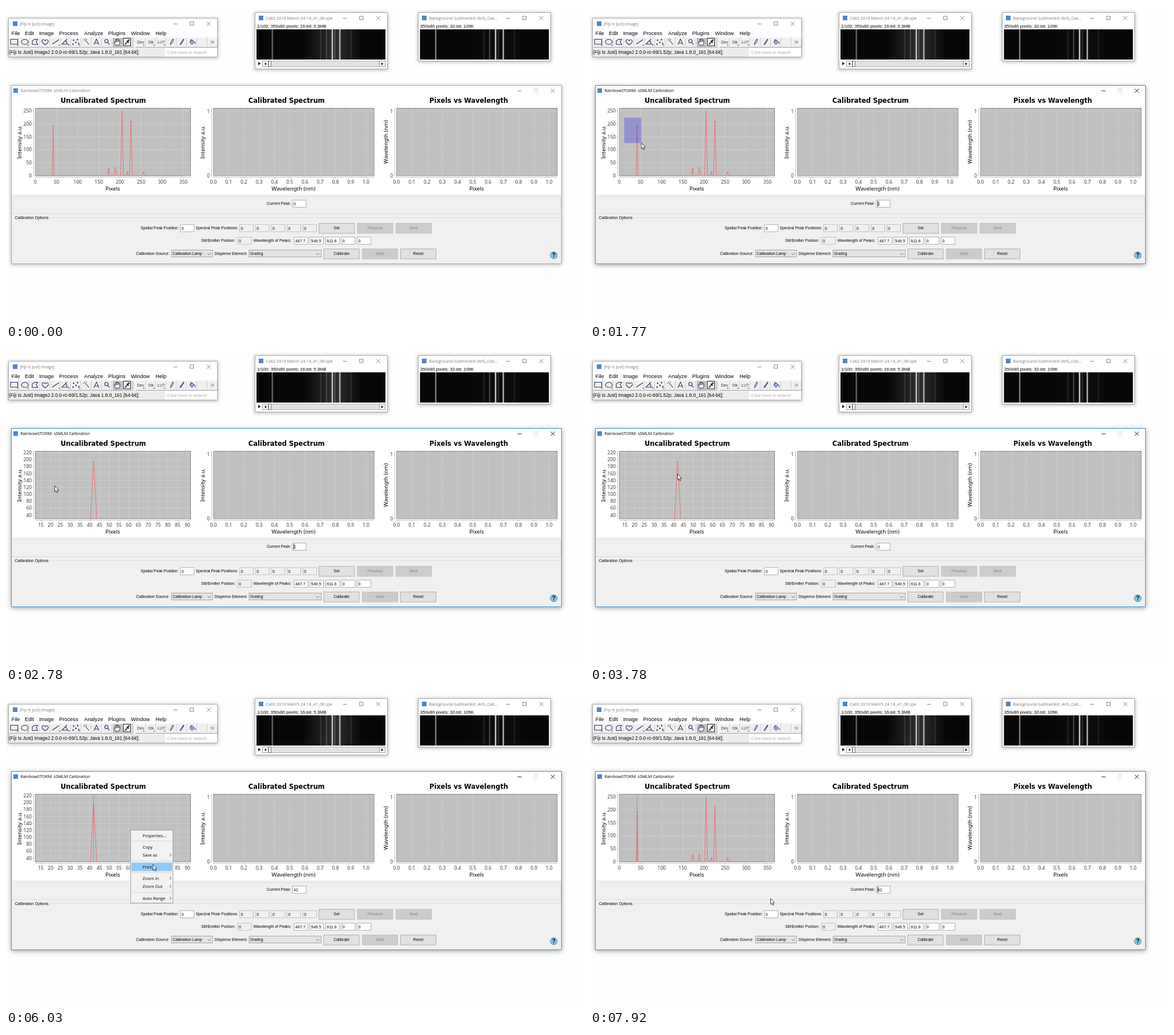
Animation, 1013 px wide and 553 px high, one loop 7990 ms. Source, as an HTML page:

```html
<!DOCTYPE html>
<html lang="en">
<head>
<meta charset="utf-8">
<title>Spectral calibration</title>
<style>
  html, body { margin: 0; width: 100%; height: 100%; overflow: hidden; background: #fefefe; }
  svg { display: block; width: 1013px; height: 553px; }
  text { white-space: pre; }
  .lib { font-family: "Liberation Sans", Arial, sans-serif; }
  .ui { font-family: "Open Sans", "Noto Sans", sans-serif; }
  .plot { font-family: "Noto Sans", "Open Sans", sans-serif; }
  .head { font-family: "DejaVu Sans", sans-serif; font-weight: 700; }
  .win { filter: drop-shadow(0 1.5px 3px rgba(0, 0, 0, .33)); }
  .idle { color: #777; }
  #main { color: #777; --edge: #aaa; }
  #main.active { color: #000; --edge: #3c94da; }
  #main.active .win { filter: drop-shadow(0 2px 4.5px rgba(0, 0, 0, .36)); }
</style>
</head>
<body>
<svg id="stage" viewBox="0 0 1013 553"></svg>
<script>
const LOOP = 7990;

// ---------- drawing helpers (y of text is its visual middle) ----------
const text = (x, y, s, { size = 6.85, font = 'lib', fill = '#000', anchor = 'start', extra = '' } = {}) =>
  `<text class="${font}" x="${x}" y="${(y + size * .36).toFixed(2)}" font-size="${size}" fill="${fill}" text-anchor="${anchor}" ${extra}>${s}</text>`;
const rect = (x, y, w, h, fill, stroke = 'none', extra = '') =>
  `<rect x="${x}" y="${y}" width="${w}" height="${h}" fill="${fill}" stroke="${stroke}" ${extra}/>`;
const path = (d, stroke = '#000', fill = 'none', extra = '') =>
  `<path d="${d}" stroke="${stroke}" fill="${fill}" ${extra}/>`;
const group = (id, body, extra = '') => `<g id="${id}" ${extra}>${body}</g>`;

function titleBar(x, y, label, buttonX, maxColor = 'currentColor') {
  const b = buttonX;
  return rect(x, y - 4, 8, 8, '#4f86c0') +
    text(x + 12.5, y, label, { size: 7.35, font: 'ui', fill: 'currentColor' }) +
    path(`M${b - 3.5} ${y + .5}h7M${b + 54.8} ${y - 3.3}l7 7m0-7l-7 7`, 'currentColor', 'none', 'stroke-width=".9"') +
    rect(b + 25.7, y - 3, 6, 6, 'none', maxColor, 'stroke-width=".9"');
}
const frame = (x, y, w, h, edge = '#aaa', fill = '#fff') => rect(x, y, w, h, fill, edge, 'class="win"');

// ---------- toolbar window ----------
function toolbarWindow() {
  const ink = '#24325c', cy = 63;
  let s = frame(4.5, 21.5, 366, 68) + titleBar(12, 31, '(Fiji Is Just) ImageJ', 297);
  const menus = [['File', 9.5], ['Edit', 33], ['Image', 58], ['Process', 93], ['Analyze', 137],
    ['Plugins', 179], ['Window', 219], ['Help', 262]];
  for (const [name, x] of menus) s += text(x, 47.5, name, { size: 9.3 });
  s += rect(5, 54.5, 365, 18.5, '#f0f0f0') + rect(5, 73, 365, 16, '#ececec') + rect(279, 74, 91, 15, '#fff');
  s += rect(186, 55, 18, 18, '#c4c4c4');
  for (let i = 0; i < 20; i++) {
    const x = i < 12 ? 5.5 + 18.1 * i : 227 + 18.05 * (i - 12);
    s += path(`M${x} 72.5V55.5h17.5`, '#fff') + path(`M${x + 17.6} 55.5v17H${x}`, '#a4a4a4');
  }
  const icons = [
    'M8 58.5h12.5v8.5H8z',
    'M27 63a6 4.5 0 1 0 12 0a6 4.5 0 1 0-12 0',
    'M46 67.5V61l4-2.5h5.5L53 62.5l2.5 5z',
    'M68.5 61q-2.5-3.5-5-1q-2 3 5 8q7-4 5.5-7q-2-3.5-5.5 0',
    'M81 67l12-8',
    'M110 67H98l9-9m-2.5 3q2.5 2 2.5 6',
    'M117 60h3m-1.5-1.5v3M124 59h3m-1.5-1.5v3M121 64h3m-1.5-1.5v3M126 66h3m-1.5-1.5v3M116 67h3m-1.5-1.5v3',
    'M139 60l6.5 7.5M135.5 60h2M138 57v1.5M141.5 58l-1 1',
    'M154 68l4.5-10l4.5 10m-7.2-3h5.5',
    'M173 61.5a3 3 0 1 0 6 0a3 3 0 1 0-6 0M178.2 63.8l3.3 4'
  ];
  icons.forEach(d => { s += path(d, ink, 'none', 'stroke-width="1.1"'); });
  s += path('M192 69l-3-5.5q1-1.5 3 .5v-5q1-1.5 1.8 0v-1q1-1.5 1.9 0v1q1-1.3 1.9 0v1q1-1 1.9.5v5l-1.5 3.5zM193.8 59v4m1.9-4.5v4.5m1.9-3v3', ink, '#f4f4f4');
  s += rect(205.5, 56.5, 13, 13.5, '#f4f4f4', '#111') +
    path('M208 68l5-5', '#222', 'none', 'stroke-width="1.6"') + path('M212 61l3 3m-1-3l2.5-2', '#111', 'none', 'stroke-width="2.2"');
  [['Dev', 236], ['Stk', 254], ['LUT', 272]].forEach(([n, x]) => {
    s += text(x, cy, n, { size: 7, fill: ink, anchor: 'middle' });
  });
  s += path('M288 68l1-4 3-6 2 1-3 6z', ink, '#dfe8fa') + path('M305 68q0-3 2-4l4-6 1 1-4 6q-1 3-3 3', ink, '#8fb3e8') +
    path('M322 63l4-4 4 4-4 4.5zM324 58v4M331 63q1.5 3 0 4', ink, '#8fb3e8');
  [21, 39, 94, 111, 129, 242, 260, 278].forEach(x => { s += path(`M${x - 2} 68h3l-1.5 2z`, 'none', '#c22'); });
  return s + text(361.5, 62.5, '»', { size: 13, fill: '#c2603c', anchor: 'middle' }) +
    text(5, 81, '(Fiji Is Just) ImageJ 2.0.0-rc-69/1.52p; Java 1.8.0_161 [64-bit];', { size: 8.3 }) +
    text(282.5, 81, 'Click here to search', { size: 7.9, fill: '#aaa' });
}

// ---------- image windows ----------
// lines: offset, width, brightness; each gets a soft halo
function spectrumImage(x, glow, lines) {
  let s = rect(x, 41, 226, 53, '#070707') + rect(x + 80, 41, 105, 53, 'url(#haze)', 'none', `opacity="${glow}"`);
  for (const [dx, w, a] of lines) {
    s += rect(x + dx - 1, 41, w + 2, 53, '#fff', 'none', `opacity="${a * .25}"`) +
      rect(x + dx, 41, w, 53, '#fff', 'none', `opacity="${a * .85}"`);
  }
  return s;
}
function imageWindows() {
  return frame(436.5, 11.5, 232, 99) + titleBar(443, 21, 'Cali2 2016 March 24 14_41_08.spe', 594) +
    text(440, 35.5, '1/100; 350x80 pixels; 16-bit; 5.3MB', { size: 7.75 }) +
    spectrumImage(439, .9, [[27.2, 1.2, .55], [112, 1, .16], [122, 1.2, .22], [132, 1.7, .9], [137, 1, .2], [145.2, 1.7, .75], [165, 1, .12]]) +
    path('M442 98l4.5 3-4.5 3z', 'none', '#222') + rect(449.5, 96.5, 215, 10, '#e2e2e2', '#b0b0b0') +
    rect(449.5, 96.5, 10, 10, '#fafafa', '#999') + rect(654.5, 96.5, 10, 10, '#fafafa', '#999') +
    rect(460.5, 96.5, 4, 10, '#fafafa', '#777') +
    path('M456 99v5l-3-2.5zM658 99v5l3-2.5z', 'none', '#000') +
    frame(722.5, 11.5, 232, 85) + titleBar(729, 21, 'Background-Subtracted: AVG_Cali...', 880) +
    text(726, 35.5, '350x80 pixels; 32-bit; 109K', { size: 7.8 }) +
    spectrumImage(725.5, .12, [[27, 1.3, .7], [112, 1, .16], [121.5, 1.2, .3], [131.7, 1.8, .95], [137, 1, .2], [145.2, 1.7, .85], [165, 1, .14]]);
}

// ---------- charts ----------
const TOP = 179.5, BOTTOM = 298;
const range = (a, b, step) => Array.from({ length: Math.round((b - a) / step) + 1 }, (_, i) => a + i * step);

function axes(left, right, xs, ys, px, py, digits = 0) {
  let grid = '', ticks = `M${left} 300.5H${right}M${left - 3} ${TOP}V${BOTTOM}`, labels = '';
  const style = { size: 8.5, font: 'plot', fill: '#404040' };
  for (const v of xs) {
    const x = px(v);
    grid += `M${x} ${TOP}V${BOTTOM}`;
    ticks += `M${x} 300.5v2`;
    labels += text(x, 308.8, v.toFixed(digits), { ...style, anchor: 'middle' });
  }
  for (const v of ys) {
    const y = py(v);
    grid += `M${left} ${y}H${right}`;
    ticks += `M${left - 3} ${y}h-2`;
    labels += text(left - 6.3, y, v, { ...style, anchor: 'end' });
  }
  return path(grid, '#fff', 'none', 'stroke-width=".6" stroke-dasharray="1.3" opacity=".65"') +
    path(ticks, '#aaa', 'none', 'stroke-width=".7"') + labels;
}
function chartBase(left, right, title, titleX, xLabel, yLabel, yx) {
  const label = { size: 9.6, font: 'plot', anchor: 'middle' };
  return rect(left, TOP, right - left, BOTTOM - TOP, '#c0c0c0', '#858585') +
    text(titleX, 165.5, title, { size: 11.5, font: 'head', anchor: 'middle' }) +
    text((left + right) / 2 - .5, 320.3, xLabel, label) +
    text(0, 0, yLabel, { ...label, extra: `transform="translate(${yx} 239) rotate(-90)"` });
}
// position, height, half width
const PEAKS = [[42, 197, 1.9], [173.4, 30, 2], [189, 33, 2.8], [205, 250, 3.5], [218, 17, 2], [226, 213, 3.2], [256, 16, 2.5]];
function spectrum(px, py) {
  let d = `M${px(0)} ${py(0)}`;
  for (const [p, h, w] of PEAKS) d += `L${px(p - w)} ${py(0)}L${px(p)} ${py(h)}L${px(p + w)} ${py(0)}`;
  return path(d + `L${px(349)} ${py(0)}`, '#ff5555', 'none', 'clip-path="url(#plotArea)" stroke-width=".75"');
}
function charts() {
  const fullX = v => 51.5 + v * .741, fullY = v => BOTTOM - v * .4565;
  const zoomX = v => 61 + (v - 15) * 3.4267, zoomY = v => 291.5 - (v - 40) * .6085;
  const unitY = v => BOTTOM - v * 113;
  const unit = left => axes(left, left + 281.5, range(0, 1, .1), [0, 1], v => left + v * 267.5, unitY, 1);
  return chartBase(51.5, 323.5, 'Uncalibrated Spectrum', 170.5, 'Pixels', 'Intensity a.u.', 23.5) +
    group('full', axes(51.5, 323.5, range(0, 350, 50), range(0, 250, 50), fullX, fullY) + spectrum(fullX, fullY)) +
    group('zoom', axes(51.5, 323.5, range(15, 90, 5), range(40, 220, 20), zoomX, zoomY) + spectrum(zoomX, zoomY)) +
    path('M0 180V298', '#505078', 'none', 'id="marker" stroke-width=".6" stroke-dasharray="2 1.3"') +
    chartBase(363.5, 645, 'Calibrated Spectrum', 491.7, 'Wavelength (nm)', 'Intensity a.u.', 344.5) + unit(363.5) +
    chartBase(684.5, 966, 'Pixels vs Wavelength', 811, 'Pixels', 'Wavelength (nm)', 665.5) + unit(684.5);
}

// ---------- form ----------
const field = (x, y, s, off, id = '') => rect(x + .5, y - 6.2, 24, 12.5, off ? '#f0f0f0' : '#fff', off ? '#b8b8b8' : '#a4a4a4', 'stroke-width=".9"') +
  text(x + 2.5, y, s, { size: 7.1, extra: id });
const button = (x, y, s, off) => rect(x + .5, y - 8.5, 62, 17.5, off ? '#cccccc' : '#e1e1e1', off ? '#bfbfbf' : '#adadad') +
  text(x + 31.5, y, s, { fill: off ? '#838383' : '#000', anchor: 'middle' });
const combo = (x, y, w, s) => rect(x + .5, y - 6.5, w, 12, '#e3e3e3', '#a4a4a4') + text(x + 2.5, y, s) +
  path(`M${x + w - 8} ${y - .8}l2.5 2.5 2.5-2.5`, '#444', 'none', 'stroke-width=".8"');
function form() {
  let s = rect(10, 330.5, 963, 121.5, '#f0f0f0') +
    path('M20 334.5H971.5V364.5H11M75 371.5H971.5', '#dcdcdc') +
    text(15.5, 371, 'Calibration Options', { size: 6.95 }) +
    text(457, 347, 'Current Peak:') + field(501.5, 347, '0', false, 'id="peak"') +
    text(236, 390, 'Spatial Peak Position:') + field(305, 390, '0') + text(332.5, 390, 'Spectral Peak Positions:');
  for (let i = 0; i < 5; i++) {
    s += field(409 + 27.7 * i, 390, '0', true) + field(504.5 + 27.6 * i, 412, ['487.7', '546.5', '611.6', '0', '0'][i]);
  }
  return s + button(548, 390, 'Set') + button(615.5, 390, 'Previous', true) + button(683, 390, 'Next', true) +
    text(342, 412, 'Slit/Emitter Postion:') + field(405.5, 412, '0', true) + text(433.5, 412, 'Wavelength of Peaks:') +
    text(228, 435, 'Calibration Source:') + combo(289.5, 435, 72, 'Calibration Lamp') +
    text(365.5, 435, 'Disperive Element:') + combo(425.5, 435, 126.5, 'Grating') +
    button(556.5, 435, 'Calibrate') + button(624, 435, 'Save', true) + button(691, 435, 'Reset') +
    '<circle cx="960" cy="437.5" r="6" fill="#83c9ea" stroke="#4d7f9c"/>' +
    text(960, 437.5, '?', { size: 10, anchor: 'middle', extra: 'font-weight="700"' });
}

// ---------- context menu ----------
const ITEMS = [['Properties...', 252], ['Copy', 272], ['Save as', 286.5, 1], ['Print...', 307], ['Zoom In', 327, 1],
  ['Zoom Out', 341.5, 1], ['Auto Range', 362, 1]];
const SUB_ITEMS = [['Both Axes', 362], ['Domain Axis', 382.5], ['Range Axis', 397]];
function menu(id, x, y, w, h, items, gaps) {
  let s = rect(x, y, w, h, '#f2f2f2', '#a0a0a0') + rect(x + 1.5, 0, w - 3, 15, '#91c9f7', 'none', `id="${id}Hot"`);
  for (const g of gaps) s += path(`M${x + 2} ${g}h${w - 4}`, '#d4d4d4');
  for (const [name, cy, more] of items) {
    s += text(x + 21, cy, name, { size: 7.4, font: 'ui' });
    if (more) s += path(`M${x + 68.5} ${cy - 2.5}l2.3 2.3-2.3 2.3`, '#333', 'none', 'stroke-width=".9"');
  }
  return group(id, s);
}

document.getElementById('stage').innerHTML =
  `<defs><clipPath id="plotArea"><rect x="51.5" y="179" width="272" height="119.5"/></clipPath>
  <linearGradient id="haze"><stop stop-color="#070707"/><stop offset=".55" stop-color="#343434"/><stop offset="1" stop-color="#070707"/></linearGradient></defs>` +
  group('tools', toolbarWindow() + imageWindows(), 'class="idle"') +
  group('main', frame(9.5, 139.5, 964, 313, 'var(--edge)') + titleBar(13, 148.5, 'RainbowSTORM: sSMLM Calibration', 900, '#d0d0d0') + charts() + form()) +
  rect(60, 196, 0, 0, '#00f', 'none', 'id="select" opacity=".247"') +
  path('M504.5 342v10', '#000', 'none', 'id="caret"') +
  menu('popup', 218.5, 242.5, 74, 128, ITEMS, [261.5, 296.5, 317, 352]) +
  menu('submenu', 288.5, 352.5, 74.5, 52.5, SUB_ITEMS, [372.5]) +
  path('M.5.5V10.8L2.8 8.7 4.4 12.3 6 11.6 4.400 8H7.5Z', '#111', '#fff', 'id="cursor" stroke-width=".8"');

// ---------- timeline ----------
// first step, last step, number of steps, target
const MOVES = [[70, 280, 4, 179, 356], [440, 600, 3, 89, 173], [760, 990, 4, 60, 195], [1460, 2160, 10, 119, 285],
  [2620, 2770, 3, 85, 240], [2850, 2930, 2, 130, 212], [3010, 3090, 2, 154, 221], [3780, 3780, 1, 153, 219],
  [3860, 3860, 1, 152, 219], [4940, 5190, 4, 217, 242], [5880, 6030, 3, 257, 302], [6110, 6580, 7, 274, 357],
  [7130, 7370, 4, 316, 362]];
const CARET = [[1310, 1840], [2310, 2850], [3320, 3780], [4240, 4940], [7920, LOOP]];
const el = id => document.getElementById(id);
const within = (t, a, b) => t >= a && t < b;
const show = (id, on) => { el(id).style.display = on ? '' : 'none'; };

function cursorAt(t) {
  let x = 1191, y = 609;
  for (const [a, b, n, tx, ty] of MOVES) {
    if (t < a) break;
    const gap = n > 1 ? (b - a) / (n - 1) : 1;
    const k = Math.min(n, Math.floor((t - a + 4) / gap) + 1) / n;
    x += (tx - x) * k;
    y += (ty - y) * k;
  }
  return [x, y];
}
function highlight(id, items, y, on) {
  const hit = on && items.find(([, cy]) => Math.abs(y - cy) <= 7.5);
  show(id, !!hit);
  if (hit) el(id).setAttribute('y', hit[1] - 7.5);
}
function draw(t) {
  const [x, y] = cursorAt(t), zoomed = within(t, 2240, 7920), dragging = within(t, 1460, 2240);
  el('cursor').setAttribute('transform', `translate(${x} ${y})`);
  show('cursor', t >= 70);
  el('main').classList.toggle('active', t >= 1310);
  show('full', !zoomed);
  show('zoom', zoomed);
  show('marker', t >= 4240);
  el('marker').setAttribute('transform', `translate(${zoomed ? 153.5 : 82.6} 0)`);
  el('peak').textContent = t < 4410 ? '0' : '42';
  show('caret', CARET.some(([a, b]) => within(t, a, b)));
  show('select', dragging);
  el('select').setAttribute('width', Math.max(0, x - 59.5));
  el('select').setAttribute('height', Math.max(0, y - 195.5));
  show('popup', within(t, 5570, 7920));
  show('submenu', within(t, 6660, 7920));
  highlight('popupHot', ITEMS, t < 6660 ? y : 362, t >= 5880);
  highlight('submenuHot', SUB_ITEMS, y, x > 289);
}

const start = performance.now();
function tick() {
  draw((performance.now() - start) % LOOP);
  requestAnimationFrame(tick);
}
tick();
</script>
</body>
</html>
```
